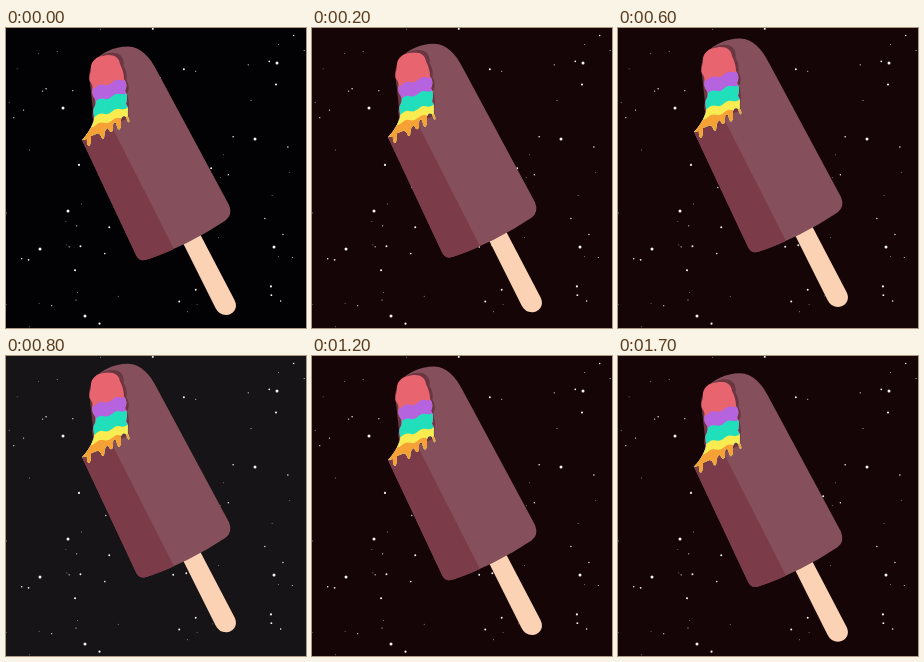
Animation, 300 px wide and 300 px high, one loop 1800 ms. Source, as an HTML page:

```html
<!DOCTYPE html>
<html lang="en">
<head>
<meta charset="utf-8">
<title>Floating ice pop</title>
<style>
html, body { margin: 0; width: 100%; height: 100%; overflow: hidden; background: #160507; }
svg { display: block; width: 100vw; height: 100vh; }
</style>
</head>
<body>
<svg viewBox="0 0 300 300">
  <defs>
    <clipPath id="bite">
      <path d="M85 42C84 34 90 28 99 27.500C107 26 113 29 114 36C117 42 118 47 118 51C121 55 121 59 119 63C122 67 121 72 120 76C124 81 120 86 123 91Q124 95 122 94L120 89Q117 86 115 91L115 98Q113.500 104 111.500 100L110 95Q107 93 107 98L107 102Q105 106 103 102L102 100Q99 101 98.500 106L98 110Q96 112 95 108Q93 104 90 106L85 108Q85 118 82.500 118Q80.500 116 81 111L76 112Q83 105 87 95C90 89 86 85 88 80C90 76 91 73 87 68C85 62 88 59 85 55C82 51 84 47 85 42Z"/>
    </clipPath>
  </defs>
  <rect id="sky" width="300" height="300"/>
  <g id="stars" fill="#f4f2f2"></g>
  <g id="pop">
    <path id="stick" d="M176 213L194 206L228.500 272C233 281 226 287 220 287Q213 287 209.500 280Z" fill="#fbd2b4"/>
    <path id="coat" d="M76 112C83 106 87 98 87 91C85 84 90 75 87 68C85 62 85 58 83.500 52C83 47 85 37 89 32C96 25 107 18.500 122 18.500C135 19 144 29 151 43L223 177Q227 187 219.500 192.500Q183 217 141 231.500Q134 234 130.500 228Z" fill="#85505b"/>
    <path id="side" d="M76 112Q83 107 87 97L107 101L168 221Q153 228 141 231.500Q134 234 130.500 228Z" fill="#7c3b48"/>
    <path id="rim" d="M83.500 51C82 36 92 27 103 25C114 23 119 30 117.500 38C121 43 121 48 120.500 52C124 58 123 63 121 66C125 76 121 84 123 90L104 98L88 92Z" fill="#693641"/>
    <g id="layers" clip-path="url(#bite)"></g>
  </g>
</svg>
<script>
const $ = id => document.getElementById(id);
const STEP = 100, COUNT = 18, RISE = 12;

let seed = 7;
function random() {
  seed = (seed * 16807) % 2147483647;
  return seed / 2147483647;
}

const star = (x, y, r) => `<circle cx="${x}" cy="${y}" r="${r}"/>`;

// A few bright stars, then faint ones scattered around them
function makeStars() {
  const bright = [[57, 80], [271, 35], [62, 183], [34, 221], [268, 219], [249, 111], [79, 288]];
  let out = bright.map(([x, y]) => star(x, y, 1.5)).join("");
  for (let i = 0; i < 85; i++) {
    out += star(300 * random(), 300 * random(), 0.4 + 0.7 * random() ** 2);
  }
  return out;
}

// Slanted, rippled top edge, filled down to the end of the drips
function layer(top, color) {
  let d = "M74 122";
  for (let x = 74; x <= 128; x += 2) {
    d += `L${x} ${top - 0.29 * (x - 87) + 1.3 * Math.sin(x / 2.6)}`;
  }
  return `<path d="${d}V122Z" fill="${color}"/>`;
}

function skyColor(step) {
  if (step === 0) return "#020104";
  return step >= 7 && step < 11 ? "#161416" : "#160507";
}

function draw(ms) {
  const step = Math.floor(ms / STEP) % COUNT;
  const half = COUNT / 2;
  const lift = RISE * (1 - Math.abs(step - half) / half);
  $("pop").setAttribute("transform", `translate(0 ${-lift})`);
  $("sky").setAttribute("fill", skyColor(step));
}

$("stars").innerHTML = makeStars();
$("layers").innerHTML =
  layer(0, "#e8646f") +
  layer(60, "#b563df") +
  layer(74, "#22dfbb") +
  layer(89, "#f9ec50") +
  layer(98, "#f5a136");

const start = performance.now();
function tick() {
  draw(performance.now() - start);
  requestAnimationFrame(tick);
}
tick();
</script>
</body>
</html>
```
